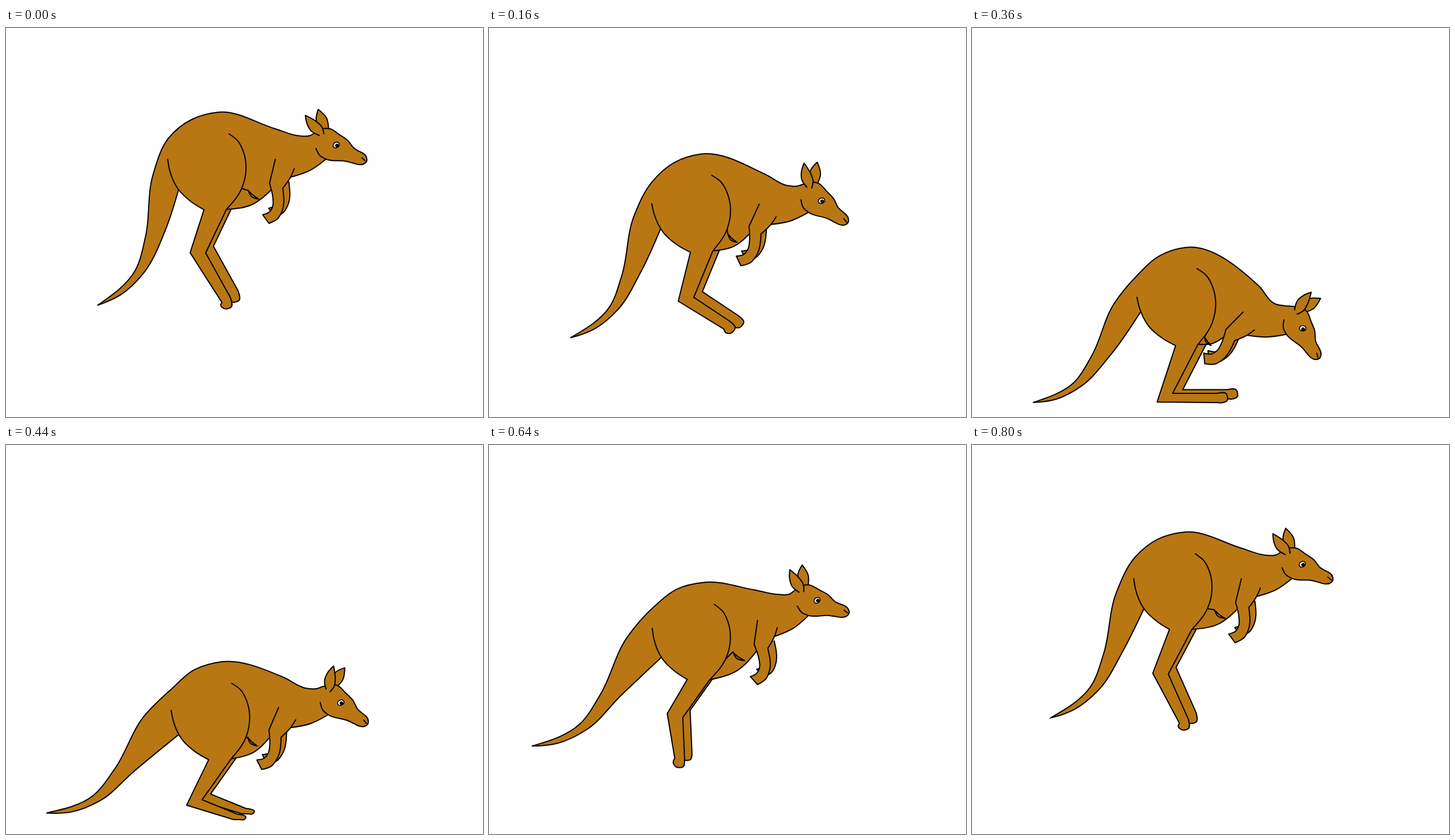
These frames come from a looping animation (829x675 px, 0.84 s). An HTML page with a canvas:

```html
<!DOCTYPE html>
<html lang="en">
<head>
<meta charset="utf-8">
<title>Hopping kangaroo</title>
<style>
html, body { margin: 0; width: 100%; height: 100%; overflow: hidden; background: #fff; }
canvas { display: block; width: 829px; height: 675px; }
</style>
</head>
<body>
<canvas id="stage" width="829" height="675"></canvas>
<script>
const ctx = document.getElementById('stage').getContext('2d');
const FUR = '#b97714', STEP = 40, CYCLE = 21, GROUND = 650;

// Key poses of one hop, in steps, and the joint values at each of them.
const KEYS = [0, 4, 7, 9, 13, 16, 20];
const JOINTS = {
  hipY: [228, 305, 402, 467, 418, 318, 232],
  chestY: [41, 39, 48, 56, 11, 28, 41],
  chest: [0, 11, 22.6, 31, -14, -5.7, 0],
  tail: [113, 117.6, 124.4, 129.3, 138.4, 131.2, 117.8],
  ear: [0, 16, 36, 44, 36, 19, 4],
  heelX: [39, 46, 40, 35, 21, 26, 33],
  heelY: [162, 169, 176, 182, 148, 148, 164],
  shank: [61, 33.5, 13, 0, 56, 87.5, 66],
  shin: [89, 74, 70, 77, 55, 70, 86]
};

// Outlines of the parts, each around its own joint.
const skull = [[-22, -28], [-12, -28], [5, -18], [20, -8], [30, 4], [53, 20], [54, 25], [48, 32],
  [40, 33], [31, 31], [19, 28], [-17, 25], [-28, 19], [-35, 7]];
const nearEar = [[[-2, 1], [-16, -6], [-24, -19], [-27, -33]], [[-27, -33], [-8, -23], [2, -14], [6, -2]]];
const farEar = [[[-8, 0], [-16, -16], [-13, -35]], [[-13, -35], [2, -20], [6, -2]]];
const haunchRear = [[0, 0], [3, 18], [17, 51], [40, 74], [62, 88]];
const haunchFront = [[101, 88], [128, 52], [136, 17], [132, -11], [122, -31], [107, -43]];
const rump = [[2, -37], [43, -69], [90, -81]];
const armShape = [
  [[10, -41], [0, 0]],
  [[0, 0], [6, 28], [6, 38], [0, 50], [-12, 55]],
  [[-12, 55], [-1, 70]],
  [[-1, 70], [15, 61], [22, 48], [23, 9]],
  [[23, 9], [37, -11], [43, -25]]];
const toes = [[11, 18], [18, 12], [16, 0]];
// The tail runs along x from its root to its tip at 1.
const tailUnder = [[0.478, -0.182], [0.737, -0.164], [0.898, -0.094], [0.98, -0.022], [1, 0]];
const tailUpper = [[1, 0], [0.74, -0.116], [0.55, -0.095], [0.22, 0]];

function keyAt(i) {
  const n = KEYS.length, turn = Math.floor(i / n), row = i - turn * n;
  return { row, time: KEYS[row] + turn * CYCLE };
}

// Cyclic cubic interpolation with limited tangents.
function sample(values, t) {
  let i = KEYS.length - 1;
  while (KEYS[i] > t) i--;
  const [a, b, c, d] = [i - 1, i, i + 1, i + 2].map(keyAt);
  const slope = (p, q) => (values[q.row] - values[p.row]) / (q.time - p.time);
  const tangent = (p, q, r) => {
    const left = slope(p, q), right = slope(q, r);
    const m = (left * (r.time - q.time) + right * (q.time - p.time)) / (r.time - p.time);
    const limit = 1.5 * Math.min(Math.abs(left), Math.abs(right));
    return Math.max(-limit, Math.min(limit, m));
  };
  const h = c.time - b.time, s = (t - b.time) / h, u = 1 - s;
  return values[b.row] * u * u * (1 + 2 * s) + values[c.row] * s * s * (3 - 2 * s)
    + h * s * u * (u * tangent(a, b, c) - s * tangent(b, c, d));
}

function place(points, [x, y, deg], scale = 1) {
  const a = deg * Math.PI / 180, cos = scale * Math.cos(a), sin = scale * Math.sin(a);
  return points.map(([px, py]) => [x + px * cos - py * sin, y + px * sin + py * cos]);
}
const shift = (points, dx, dy) => points.map(([x, y]) => [x + dx, y + dy]);
const aboveGround = points => points.map(([x, y]) => [x, Math.min(y, GROUND)]);

// Point beside the middle of a chord, k chord lengths to its right-hand side.
const bow = ([ax, ay], [bx, by], k) =>
  [(ax + bx) / 2 - (by - ay) * k, (ay + by) / 2 + (bx - ax) * k];

// Adds a smooth curve through the points.
function curve(path, p, join) {
  const last = p.length - 1;
  const len = i => Math.hypot(p[i + 1][0] - p[i][0], p[i + 1][1] - p[i][1]) || 1;
  const slope = (i, k) => (p[i + 1][k] - p[i][k]) / len(i);
  const inner = (i, k) =>
    (slope(i - 1, k) * len(i) + slope(i, k) * len(i - 1)) / (len(i - 1) + len(i));
  const tangent = (i, k) => {
    if (last === 1) return slope(0, k);
    if (i === 0) return 1.5 * slope(0, k) - 0.5 * inner(1, k);
    if (i === last) return 1.5 * slope(last - 1, k) - 0.5 * inner(last - 1, k);
    return inner(i, k);
  };
  const handle = (i, d) => [0, 1].map(k => p[i][k] + tangent(i, k) * d / 3);
  if (join) path.lineTo(...p[0]); else path.moveTo(...p[0]);
  for (let i = 0; i < last; i++) {
    path.bezierCurveTo(...handle(i, len(i)), ...handle(i + 1, -len(i)), ...p[i + 1]);
  }
}
function outline(curves, joined = true) {
  const path = new Path2D();
  curves.forEach((c, i) => curve(path, c, joined && i > 0));
  return path;
}
const line = (...curves) => ctx.stroke(outline(curves, false));
function solid(curves) {
  const path = outline(curves);
  ctx.fill(path);
  ctx.stroke(path);
}

function drawEye(head) {
  const oval = (x, y, rx, ry, color) => {
    const [[cx, cy]] = place([[x, y]], head);
    ctx.beginPath();
    ctx.ellipse(cx, cy, rx, ry, (head[2] - 36) * Math.PI / 180, 0, 7);
    ctx.fillStyle = color;
    ctx.fill();
  };
  oval(0, 0, 6.6, 5.4, '#000');
  oval(0, 0, 5, 3.8, '#fff');
  oval(1.4, 0.8, 3.2, 3.2, '#000');
}

function draw(t) {
  const j = {};
  for (const name in JOINTS) j[name] = sample(JOINTS[name], t);
  const wave = delay => Math.cos((t - delay) * 2 * Math.PI / CYCLE);
  const tuck = Math.max(0, j.chest);

  // Joints: x, y, rotation in degrees.
  const hip = [284 - 3 * wave(0), j.hipY, -1.6 - 2.5 * wave(6.5)];
  const arm = [hip[0] + 177 - 0.72 * tuck, hip[1] + j.chestY, j.chest];
  const [eye] = place([[116, -66]], [arm[0], arm[1], 0.93 * j.chest]);
  const head = [...eye, 1.1 * j.chest + 1.5];
  const heel = [hip[0] + j.heelX, hip[1] + j.heelY];
  const knee = [heel[0] + 27, heel[1] - 15 + 0.25 * j.shank];
  const [ankle] = place([[j.shin, 0]], [...knee, j.shank]);
  const [ankleRear] = place([[0, 17]], [...ankle, j.shank]);

  const rear = place(haunchRear, hip), front = place(haunchFront, hip);
  const foot = [ankleRear, ...place(toes, [...ankle, j.shank + 12 * (1 + wave(0))]), ankle];
  const leg = [rear, [rear[4], heel], [heel, ankleRear], foot, [ankle, knee], [knee, front[0]], front]
    .map(aboveGround);
  const armCurves = armShape.map(c => place(c, arm));

  // Torso and tail form one outline hung between the joints.
  const rumpLine = place(rump, hip);
  const tailPose = [...rumpLine[0], j.tail], tailLength = 315 - j.chest;
  const tailPart = points => aboveGround(place(points, tailPose, tailLength));
  const tailBase = place([[20 - 0.37 * tuck, 47 - 0.85 * tuck]], hip);
  const [shoulder, withers, chest, chestLow, bellyTop] =
    place([[10, -94], [51, -82], [36, -10], [71, -22], [5, 10]], arm);
  const [neckTop, nape, brow, throat, neckLow, earNear, earFar] =
    place([[-46, -15], [-38, -20], [-22, -28], [-17, 25], [-46, 46], [-28, -17], [-20, -26]], head);
  const under = [...tailBase, ...tailPart(tailUnder)];
  const upper = [...tailPart(tailUpper), ...rumpLine, shoulder, withers, neckTop, nape, brow];
  const neck = [throat, bow(chestLow, neckLow, 0), chest];
  const belly = [bellyTop, bow(bellyTop, front[0], -0.12), front[0]];

  ctx.fillStyle = '#fff';
  ctx.fillRect(0, 0, 829, 675);
  ctx.fillStyle = FUR;
  ctx.strokeStyle = '#000';
  ctx.lineWidth = 2;
  ctx.lineJoin = ctx.lineCap = 'round';

  const far = (curves, dx, dy) => solid(curves.map(c => shift(c, dx, dy)));
  far(leg.slice(1, 6), 13.5 + 0.13 * j.chest, -11.5 + 0.16 * j.chest);
  far(armCurves.slice(1, 4), 10.5 - 0.1 * j.chest, -11.3 + 0.23 * j.chest);

  ctx.fill(outline([under, upper, neck, belly]));
  line(under, upper, neck, belly);

  const [pouch, pouchEnd] = shift([[-37, 13], [-18 - 0.25 * j.chest, 28]], arm[0], arm[1]);
  line([front[1], pouch], ...[0.05, 0.2].map(k => [pouch, bow(pouch, pouchEnd, k), pouchEnd]));

  for (const part of [leg, armCurves]) {
    ctx.fill(outline(part));
    line(...part);
  }

  const drawEar = (shape, base) => solid(shape.map(c => place(c, [...base, head[2] + j.ear])));
  drawEar(farEar, earFar);
  const face = place(skull, head);
  ctx.fill(outline([face]));
  line(face, place([[45, 21], [51, 26]], head));
  drawEar(nearEar, earNear);
  drawEye(head);
}

function tick() {
  draw(Math.floor(performance.now() / STEP) % CYCLE);
  requestAnimationFrame(tick);
}
tick();
</script>
</body>
</html>
```
